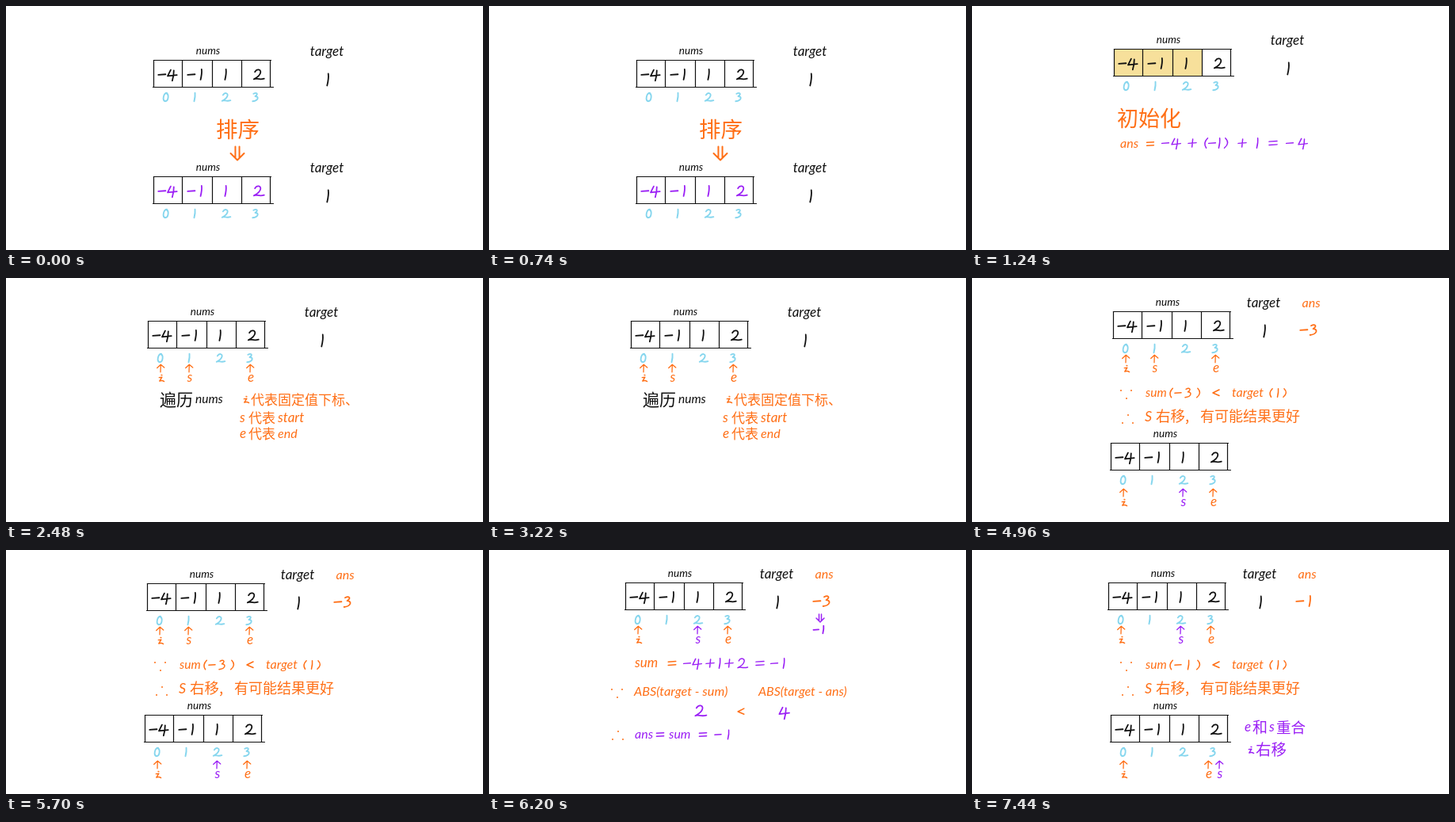
Animation, 602 px wide and 308 px high, one loop 8 s. Source, as an HTML page with a canvas:

```html
<!DOCTYPE html>
<html lang="zh">
<head>
<meta charset="utf-8">
<style>
  html, body { margin: 0; width: 100%; height: 100%; overflow: hidden; background: #fff; }
  canvas { display: block; }
</style>
</head>
<body>
<canvas id="stage" width="602" height="308"></canvas>
<script>
const ctx = document.getElementById('stage').getContext('2d');
const INK = '#111', ORANGE = '#ff6f16', PURPLE = '#9b20f5', BLUE = '#86d6ee', SAND = '#f7e09b';
const STEP = 1240, LOOP = 8000;

// Pen strokes in a box ten units high, centred on the origin.
const strokes = {
  '0': 'M1-5C-3-5-5 4-1 5C3 5 4-4 0-4.5',
  '1': 'M.5-5Q1-1-.5 5',
  '2': 'M-3-2.5C-1-6 3-5 2.5-2C2 1-2 3.5-4 4.5C-2 3 1 5.5 6 4',
  '3': 'M-2.5-4C1-6 4-4-.5-1C4-1 4 4-3.5 5',
  '4': 'M-1-4.5L-4 1.5L5 .5M2-4Q2 1 .5 6',
  '5': 'M-1-4.5L-2.5-.5C3-1 3 4-3.5 5M-1-4.5L4-5',
  '-': 'M-3.5 .3L3.5-.2',
  '+': 'M-4 .3L4-.3M.5-4L-.3 4',
  '=': 'M-4-1.5L4-2M-4 2L4 1.5',
  '<': 'M3.5-3.5L-3.5 0L3.5 3',
  '(': 'M2-5Q-3 0 .5 5',
  ')': 'M-1-5Q4 0-2 5',
  'i': 'M-3-1.5L1-2L-2.5 3.5Q1 2 4 4M0-5L1-4.8',
  '↑': 'M0 5L.3-5M-4.5-.5L.3-5L5-1',
  '⇓': 'M-1.5-5V3M1.5-5V3M-5 0L0 5L5 0',
  '~': 'M-9 1Q-6-2-4 0T1 0T5 0T9-1'
};
const pens = Object.fromEntries(Object.entries(strokes).map(([k, d]) => [k, new Path2D(d)]));

function mark(char, x, y, color, height = 14, weight = 1.5) {
  const s = height / 10;
  ctx.save();
  ctx.translate(x, y);
  ctx.scale(s, s);
  ctx.strokeStyle = color;
  ctx.lineWidth = weight / s;
  ctx.stroke(pens[char]);
  ctx.restore();
}

function marks(chars, xs, y, color, height) {
  [...chars].forEach((c, i) => mark(c, xs[i], y, color, height));
}

function word(text, x, y, color, size = 16, align = 'left') {
  ctx.font = `italic ${size}px Lato, sans-serif`;
  ctx.textAlign = align;
  ctx.fillStyle = color;
  ctx.fillText(text, x, y);
}

function hanzi(text, x, y, color, size = 17) {
  ctx.font = `${size}px "Noto Sans CJK SC", "Noto Sans CJK", sans-serif`;
  ctx.textAlign = 'left';
  ctx.fillStyle = color;
  ctx.fillText(text, x, y);
}

function line(x1, y1, x2, y2) {
  ctx.beginPath();
  ctx.moveTo(x1 + 0.5, y1 + 0.5);
  ctx.lineTo(x2 + 0.5, y2 + 0.5);
  ctx.strokeStyle = INK;
  ctx.lineWidth = 1.2;
  ctx.stroke();
}

function number(text, x, y, color, height = 13) {
  if (text[0] === '-') {
    mark('-', x - height * 0.55, y, color, height, 1.8);
    mark(text[1], x + height * 0.4, y, color, height, 1.8);
  } else mark(text, x, y, color, height, 1.8);
}

const indexX = [16, 52, 91, 129];

function array(x, y, values = ['-4', '-1', '1', '2'], color = INK, filled = 0) {
  if (filled) {
    ctx.fillStyle = SAND;
    ctx.fillRect(x, y, 37 * filled, 35);
  }
  word('nums', x + 69, y - 7, INK, 13.5, 'center');
  line(x, y, x + 148, y);
  line(x - 1, y + 34, x + 151, y + 34);
  [0, 36, 74, 111, 147].forEach(dx => line(x + dx, y, x + dx, y + 34));
  values.forEach((v, i) => number(v, x + [18, 55, 91, 132][i], y + 18.5, color));
  indexX.forEach((dx, i) => mark(String(i), x + dx, y + 47, BLUE, 10.5, 1.9));
}

function letter(name, x, y, color, size) {
  if (name === 'i') mark('i', x, y - 4, color, 9, 1.4);
  else word(name, x, y, color, size, 'center');
}

function pointer(name, x, y, color = ORANGE) {
  mark('↑', x, y + 60, color, 9.5, 1.3);
  letter(name, x + 1, y + 77, color, 17);
}

function pointers(x, y, s, color = ORANGE) {
  pointer('i', x + indexX[0], y);
  pointer('s', x + indexX[s], y, color);
  pointer('e', x + indexX[3], y);
}

function target(x, y) {
  word('target', x, y, INK, 17, 'center');
  mark('1', x + 1, y + 30, INK, 15, 1.8);
}

function answer(x, y, value, next) {
  word('ans', x, y, ORANGE, 16, 'center');
  number(value, x - 2, y + 28.5, ORANGE, 13);
  if (next) {
    mark('⇓', x - 5, y + 50, PURPLE, 10);
    number(next, x - 5, y + 64.5, PURPLE, 9.5);
  }
}

function dots(x, y, because) {
  const flip = because ? 1 : -1;
  ctx.fillStyle = ORANGE;
  [[-7, -5], [6, -5], [0, 5]].forEach(([dx, dy]) => {
    ctx.beginPath();
    ctx.arc(x + dx, y + dy * flip, 1, 0, Math.PI * 2);
    ctx.fill();
  });
}

function compare(x, y, left, right, color) {
  dots(162, y - 3, true);
  word('ABS(target - sum)', x, y, ORANGE, 16.3);
  word('ABS(target - ans)', x + 157, y, ORANGE, 16);
  mark(left, x + (color === PURPLE ? 83 : 69), y + 19, color, 14, 1.8);
  mark('<', x + 135, y + 20, ORANGE, 11);
  mark(right, x + (color === PURPLE ? 189 : 209), y + 21, color, 14, 1.8);
}

function conclude(x, y, digit) {
  dots(x - 21, y - 4, false);
  word('ans', x, y, PURPLE);
  word('sum', x + 43, y, PURPLE);
  marks('==-' + digit, [x + 32, x + 86, x + 105, x + 118], y - 5, PURPLE, 11.5);
}

function moveRight(digit) {
  dots(195, 147, true);
  word('sum', 219, 150, ORANGE, 15.5);
  marks('(-' + digit + ')<', [251, 260, 273, 286, 308], 145, ORANGE, 11.5);
  word('target', 328, 150, ORANGE, 16);
  marks('(1)', [377, 386, 395], 145, ORANGE, 10.5);
  dots(197, 178, false);
  word('S', 218, 181, ORANGE, 18);
  hanzi('右移,', 232, 181, ORANGE, 18.5);
  hanzi('有可能结果更好', 288, 181, ORANGE, 18);
}

const scenes = [
  () => {
    array(186, 68);
    target(405, 63);
    hanzi('排序', 265, 166, ORANGE, 27.5);
    mark('⇓', 292, 186, ORANGE, 17, 2);
    array(186, 215, ['-4', '-1', '1', '2'], PURPLE);
    target(405, 210);
  },
  () => {
    array(179, 54, undefined, INK, 3);
    target(398, 49);
    hanzi('初始化', 183, 152, ORANGE, 27);
    word('ans', 187, 179, ORANGE);
    mark('=', 225, 174, ORANGE, 11);
    marks('-4+(-1)+1=-4', [244, 257, 278, 295, 303, 312, 321, 341, 360, 380, 401, 417], 173, PURPLE, 12.5);
  },
  () => {
    array(179, 54);
    target(398, 49);
    pointers(179, 54, 1);
    hanzi('遍历', 194, 161, INK, 21);
    word('nums', 239, 158, INK, 15.5);
    letter('i', 303, 158, ORANGE);
    hanzi('代表固定值下标、', 309, 160, ORANGE, 17);
    word('s', 295, 182, ORANGE, 17);
    hanzi('代表', 306, 183, ORANGE);
    word('start', 343, 182, ORANGE, 17);
    word('e', 295, 202, ORANGE, 17);
    hanzi('代表', 306, 203, ORANGE);
    word('end', 343, 202, ORANGE);
  },
  () => {
    array(179, 54);
    target(371, 49);
    answer(429, 49, '-4', '-3');
    pointers(179, 54, 1);
    word('sum', 181, 165, ORANGE);
    mark('=', 218, 161, ORANGE, 11);
    ['i', 's', 'e'].forEach((k, i) => word(`nums[${k}]`, [229, 299, 375][i], 165, PURPLE, 16.5));
    marks('++', [289, 365], 161, PURPLE, 10);
    mark('=', 218, 181, PURPLE, 11);
    number('-3', 240, 180, PURPLE, 11.5);
    mark('~', 238, 194, PURPLE, 10, 1);
    hanzi('这个结果更接近', 263, 189, PURPLE, 16.5);
    word('target', 381, 187, PURPLE, 16);
    compare(185, 218, '4', '5', ORANGE);
    conclude(186, 273, '3');
  },
  () => {
    array(178, 42);
    target(368, 37);
    answer(428, 37, '-3');
    pointers(178, 42, 1);
    moveRight('3');
    array(175, 208);
    pointers(175, 211, 2, PURPLE);
  },
  () => {
    array(172, 41);
    target(363, 36);
    answer(423, 36, '-3', '-1');
    pointers(172, 41, 2, PURPLE);
    word('sum', 184, 148, ORANGE, 17);
    mark('=', 231, 143, ORANGE, 12);
    marks('-4+1+2=-1', [250, 262, 279, 291, 303, 319, 342, 360, 372], 143, PURPLE, 12.5);
    compare(183, 184, '2', '4', PURPLE);
    conclude(184, 238, '1');
  },
  () => {
    array(172, 41);
    target(363, 36);
    answer(423, 36, '-1');
    pointers(172, 41, 2, PURPLE);
    moveRight('1');
    array(175, 208);
    pointer('i', 191, 211);
    pointer('e', 298, 211);
    pointer('s', 312, 211, PURPLE);
    word('e', 344, 229, PURPLE, 17);
    hanzi('和', 354, 231, PURPLE, 19);
    word('s', 375, 229, PURPLE, 17);
    hanzi('重合', 384, 231, PURPLE, 18.5);
    letter('i', 352, 257, PURPLE);
    hanzi('右移', 358, 259, PURPLE, 19.5);
  }
];

function draw() {
  ctx.fillStyle = '#fff';
  ctx.fillRect(0, 0, 602, 308);
  ctx.lineCap = ctx.lineJoin = 'round';
  scenes[Math.floor(performance.now() % LOOP / STEP)]();
  requestAnimationFrame(draw);
}
draw();
</script>
</body>
</html>
```
